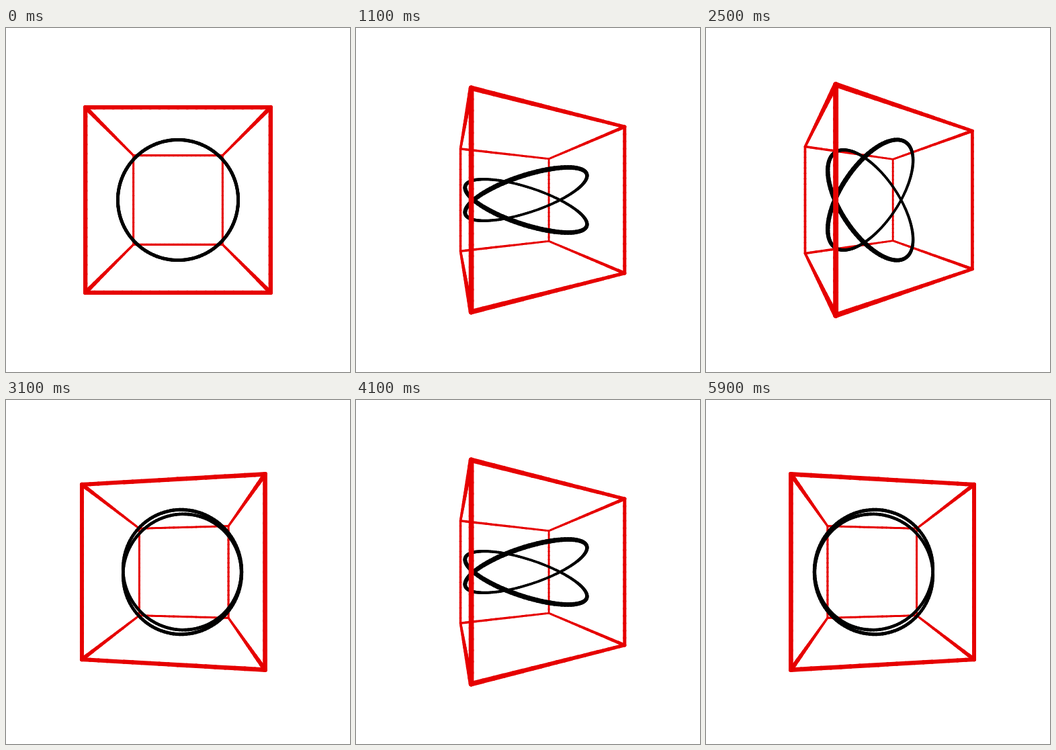
These frames come from a looping animation (512 px wide and 512 px high, 6000 ms). An HTML page with a canvas:

```html
<!DOCTYPE html>
<html lang="en">
<head>
<meta charset="utf-8">
<title>Rotating cube and circles</title>
<style>
  html, body { margin: 0; width: 100%; height: 100%; overflow: hidden; background: #fff; }
  canvas { display: block; width: 512px; height: 512px; }
</style>
</head>
<body>
<canvas id="stage" width="512" height="512"></canvas>
<script>
const ctx = document.getElementById('stage').getContext('2d');
const CENTER = 256, FOCAL = 256, DISTANCE = 2.857;
const STEPS = 60, STEP_MS = 100;
const RED = '#e60000', BLACK = '#000';
const RED_WIDTH = 0.046, BLACK_WIDTH = 0.054;
const EDGE_PARTS = 20, CIRCLE_PARTS = 120;

const rotX = ([x, y, z], a) =>
  [x, y * Math.cos(a) - z * Math.sin(a), y * Math.sin(a) + z * Math.cos(a)];
const rotY = ([x, y, z], a) =>
  [x * Math.cos(a) - z * Math.sin(a), y, x * Math.sin(a) + z * Math.cos(a)];

function polyline(at, parts) {
  return Array.from({ length: parts + 1 }, (_, i) => at(i / parts));
}

const edges = [];
for (const u of [-1, 1]) {
  for (const v of [-1, 1]) {
    const along = place => polyline(k => place(2 * k - 1), EDGE_PARTS);
    edges.push(along(s => [s, u, v]), along(s => [u, s, v]), along(s => [u, v, s]));
  }
}

const circle = polyline(k => {
  const a = 2 * Math.PI * k;
  return [Math.cos(a), Math.sin(a), 0];
}, CIRCLE_PARTS);

function project([x, y, z]) {
  const scale = FOCAL / (DISTANCE - z);
  return { x: CENTER + x * scale, y: CENTER - y * scale, z, scale };
}

function segments(points, color, width) {
  const flat = points.map(project);
  return flat.slice(1).map((b, i) => {
    const a = flat[i];
    return { a, b, color, z: a.z + b.z, width: width * (a.scale + b.scale) / 2 };
  });
}

function draw(angle) {
  const list = edges.flatMap(edge =>
    segments(edge.map(p => rotY(p, angle)), RED, RED_WIDTH));
  // The circles tilt in opposite directions while turning twice as fast as the cube.
  for (const tilt of [angle, -angle]) {
    const ring = circle.map(p => rotY(rotX(p, tilt), 2 * angle));
    list.push(...segments(ring, BLACK, BLACK_WIDTH));
  }
  list.sort((p, q) => p.z - q.z);

  ctx.fillStyle = '#fff';
  ctx.fillRect(0, 0, 512, 512);
  ctx.lineCap = 'round';
  for (const { a, b, color, width } of list) {
    ctx.strokeStyle = color;
    ctx.lineWidth = width;
    ctx.beginPath();
    ctx.moveTo(a.x, a.y);
    ctx.lineTo(b.x, b.y);
    ctx.stroke();
  }
}

let shown = -1;
function tick() {
  const step = Math.floor(performance.now() / STEP_MS) % STEPS;
  if (step !== shown) {
    shown = step;
    draw(2 * Math.PI * step / STEPS);
  }
  requestAnimationFrame(tick);
}
tick();
</script>
</body>
</html>
```
